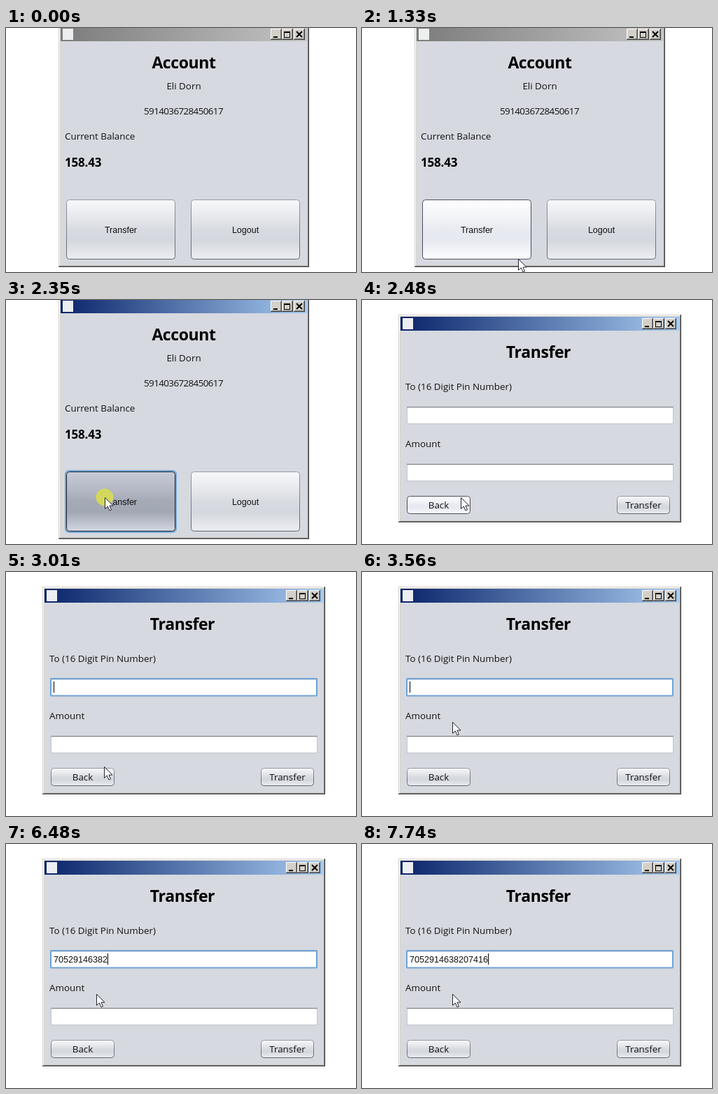
Animation of 500x350 px, one loop 8000 ms. Source, as an HTML page:

```html
<!DOCTYPE html>
<html lang="en">
<head>
<meta charset="utf-8">
<title>Account transfer</title>
<style>
  html, body { margin: 0; width: 100%; height: 100%; overflow: hidden; background: #fff; }
  svg { display: block; width: 500px; height: 350px; }
  text { font: 13.4px "Open Sans", "Noto Sans", sans-serif; fill: #111; white-space: pre; }
  .mid { text-anchor: middle; }
  .title { font-size: 23px; font-weight: 700; letter-spacing: -.4px; fill: #000; }
  .sum { font-size: 17px; font-weight: 700; letter-spacing: -.2px; fill: #000; }
  .number { letter-spacing: -.6px; }
  .plain { font: 12.5px "Liberation Sans", Arial, sans-serif; }
  .typed { font: 12.6px "Liberation Sans", Arial, sans-serif; }
  .btn { fill: url(#normal); stroke: url(#edge); }
  .btn.hover { fill: url(#hover); stroke: #4b4f58; }
  .btn.pressed { fill: url(#pressed); stroke: #1c2430; }
  .ring { fill: none; stroke: #6fa3d4; stroke-width: 2; }
  .crisp { shape-rendering: crispEdges; }
</style>
</head>
<body>
<svg viewBox="0 0 500 350">
  <defs>
    <linearGradient id="normal" x2="0" y2="1">
      <stop offset="0" stop-color="#f8f8fa"/><stop offset=".3" stop-color="#e6e8ec"/>
      <stop offset=".5" stop-color="#d8dbe1"/><stop offset=".68" stop-color="#d4d7de"/>
      <stop offset="1" stop-color="#eceef2"/>
    </linearGradient>
    <linearGradient id="hover" x2="0" y2="1">
      <stop offset="0" stop-color="#fdfdfe"/><stop offset=".3" stop-color="#f3f4f8"/>
      <stop offset=".5" stop-color="#e8eaf1"/><stop offset=".68" stop-color="#e6e9f0"/>
      <stop offset="1" stop-color="#fdfdff"/>
    </linearGradient>
    <linearGradient id="pressed" x2="0" y2="1">
      <stop offset="0" stop-color="#c5cad6"/><stop offset=".3" stop-color="#b4b9c5"/>
      <stop offset=".5" stop-color="#a4a9b6"/><stop offset=".68" stop-color="#a2a7b4"/>
      <stop offset="1" stop-color="#d2d7e2"/>
    </linearGradient>
    <linearGradient id="edge" x2="0" y2="1">
      <stop offset="0" stop-color="#95989e"/><stop offset="1" stop-color="#63666c"/>
    </linearGradient>
    <linearGradient id="idle">
      <stop offset="0" stop-color="#7c7c7c"/><stop offset="1" stop-color="#c4c4c4"/>
    </linearGradient>
    <linearGradient id="active">
      <stop offset="0" stop-color="#0a246a"/><stop offset="1" stop-color="#a6caf0"/>
    </linearGradient>
    <g id="controls" class="crisp">
      <g id="box">
        <path d="M0 0H16V16H0Z" fill="#404040"/>
        <path d="M0 0H15V15H0Z" fill="#fff"/>
        <path d="M1 1H15V15H1Z" fill="#808080"/>
        <path d="M1 1H14V14H1Z" fill="#d4d0c8"/>
      </g>
      <use href="#box" x="16"/>
      <use href="#box" x="33"/>
      <path d="M4 11H10V13H4Z"/>
      <path id="max" d="M19.500 4.500H27.500V12.500H19.500ZM19 5.500H28" fill="none" stroke="#000"/>
      <path d="M37 4L45 12M45 4L37 12" stroke="#000" stroke-width="2" shape-rendering="auto"/>
    </g>
    <g id="field" class="crisp">
      <path d="M0 0H381V25H0Z" fill="#c3c5c9"/>
      <path d="M0 0H381V1H0Z" fill="#85878c"/>
      <path d="M1 1H380V24H1Z" fill="#fff"/>
      <path d="M1 1H380V2H1Z" fill="#d5d6d9"/>
    </g>
  </defs>

  <g id="account">
    <g class="frame" data-box="75 -4 358 347"></g>
    <text class="title mid" x="254" y="58">Account</text>
    <text class="mid" x="254" y="88">Eli Dorn</text>
    <text class="number mid" x="253.500" y="124">5914036728450617</text>
    <text x="84" y="160">Current Balance</text>
    <text class="sum" x="84" y="199">158.43</text>
    <rect id="focus" class="ring" x="85" y="245" width="158" height="88" rx="5"/>
    <rect id="open" class="btn" x="86.500" y="246.500" width="155" height="85" rx="4"/>
    <rect class="btn" x="264.500" y="246.500" width="155" height="85" rx="4"/>
    <text class="plain mid" x="164" y="294">Transfer</text>
    <text class="plain mid" x="342" y="294">Logout</text>
  </g>

  <g id="transfer">
    <g class="frame" data-box="52 21 404 298"></g>
    <text class="title mid" x="252" y="83">Transfer</text>
    <text x="62" y="129">To (16 Digit Pin Number)</text>
    <use href="#field" x="64" y="153"/>
    <rect id="fieldRing" class="ring" x="64" y="153" width="380" height="24.500" rx="1"/>
    <text id="typed" class="typed" x="68" y="170"></text>
    <path id="caret" class="crisp" d="M0 157H1V173H0Z"/>
    <text x="62" y="211">Amount</text>
    <use href="#field" x="64" y="235"/>
    <rect id="back" class="btn" x="64.500" y="281.500" width="90" height="25" rx="4"/>
    <rect class="btn" x="364.500" y="281.500" width="75" height="25" rx="4"/>
    <text class="mid" x="109.500" y="299">Back</text>
    <text class="mid" x="402" y="299">Transfer</text>
  </g>

  <circle id="click" cx="141" cy="283" r="12.500" fill="#d3d85c"/>
  <path id="pointer" d="M0 0V16L3.800 12.500L6.500 18.500L9 17.400L6.400 11.600H11.500Z"
        fill="#fff" stroke="#23232f"/>
</svg>

<script>
  const LOOP = 8000, STEP = 70;
  const HOVER = 1330, PRESS = 2350, SWITCH = 2480, FOCUS = 2550, LEAVE = 3010;
  const CARET_OFF = 3080, CARET_ON = 3560;
  const DIGITS = '7052914638207416';
  const KEYS = [4020, 4220, 4420, 4750, 4950, 5150, 5480, 5680,
                5940, 6280, 6480, 6810, 7080, 7280, 7540, 7740];

  const $ = id => document.getElementById(id);
  const show = (id, on) => $(id).setAttribute('visibility', on ? 'inherit' : 'hidden');
  const setClass = (id, name) => $(id).setAttribute('class', name);
  const rect = (x, y, w, h, fill, extra = '') =>
    `<rect x="${x}" y="${y}" width="${w}" height="${h}" fill="${fill}" ${extra}/>`;

  for (const g of document.querySelectorAll('.frame')) {
    const [x, y, w, h] = g.dataset.box.split(' ').map(Number);
    g.innerHTML = '<g class="crisp">' +
      rect(x, y, w, h, '#404040') +
      rect(x, y, w - 1, h - 1, '#d4d0c8') +
      rect(x + 1, y + 1, w - 2, h - 2, '#808080') +
      rect(x + 1, y + 1, w - 3, h - 3, '#fff') +
      rect(x + 2, y + 2, w - 4, h - 4, '#d4d0c8') +
      rect(x + 3, y + 23, w - 6, h - 26, '#d6d9df') +
      rect(x + 3, y + 3, w - 6, 20, 'url(#active)', 'data-bar=""') +
      rect(x + 6, y + 5, 15, 16, '#eceef0') + '</g>' +
      `<use href="#controls" x="${x + w - 56 + (w < 400 ? 1 : 0)}" y="${y + 5}"/>`;
  }
  const bar = document.querySelector('#account [data-bar]');

  // Pointer position, advanced in whole steps
  function pointerAt(t) {
    if (t < LEAVE) {
      const rest = 1 - Math.min(9, Math.floor((t - 1190) / STEP)) / 9;
      return [142 + 143 * rest ** 2.2, 284 + 62 * rest];
    }
    const u = Math.min(7, Math.floor((t - LEAVE) / STEP) + 1) / 7;
    const e = u * u * (3 - 2 * u);
    return [142 - 12 * e, 284 - 68 * e];
  }

  function draw(t) {
    const pressed = t >= PRESS && t < SWITCH;
    show('account', t < SWITCH);
    show('transfer', t >= SWITCH);
    show('focus', pressed);
    show('click', pressed);
    bar.setAttribute('fill', t >= PRESS ? 'url(#active)' : 'url(#idle)');
    setClass('open', 'btn' + (pressed ? ' pressed' : t >= HOVER ? ' hover' : ''));
    setClass('back', 'btn' + (t < LEAVE ? ' hover' : ''));

    const count = KEYS.filter(k => t >= k).length;
    $('typed').textContent = DIGITS.slice(0, count);
    $('caret').setAttribute('transform', `translate(${68 + 7 * count})`);
    show('caret', t >= FOCUS && (t < CARET_OFF || t >= CARET_ON));
    show('fieldRing', t >= FOCUS);

    show('pointer', t >= 1190);
    const [x, y] = pointerAt(Math.max(t, 1190)).map(Math.round);
    $('pointer').setAttribute('transform', `translate(${x - .5} ${y - .5})`);
  }

  const start = performance.now();
  function tick() {
    draw((performance.now() - start) % LOOP);
    requestAnimationFrame(tick);
  }
  tick();
</script>
</body>
</html>
```
